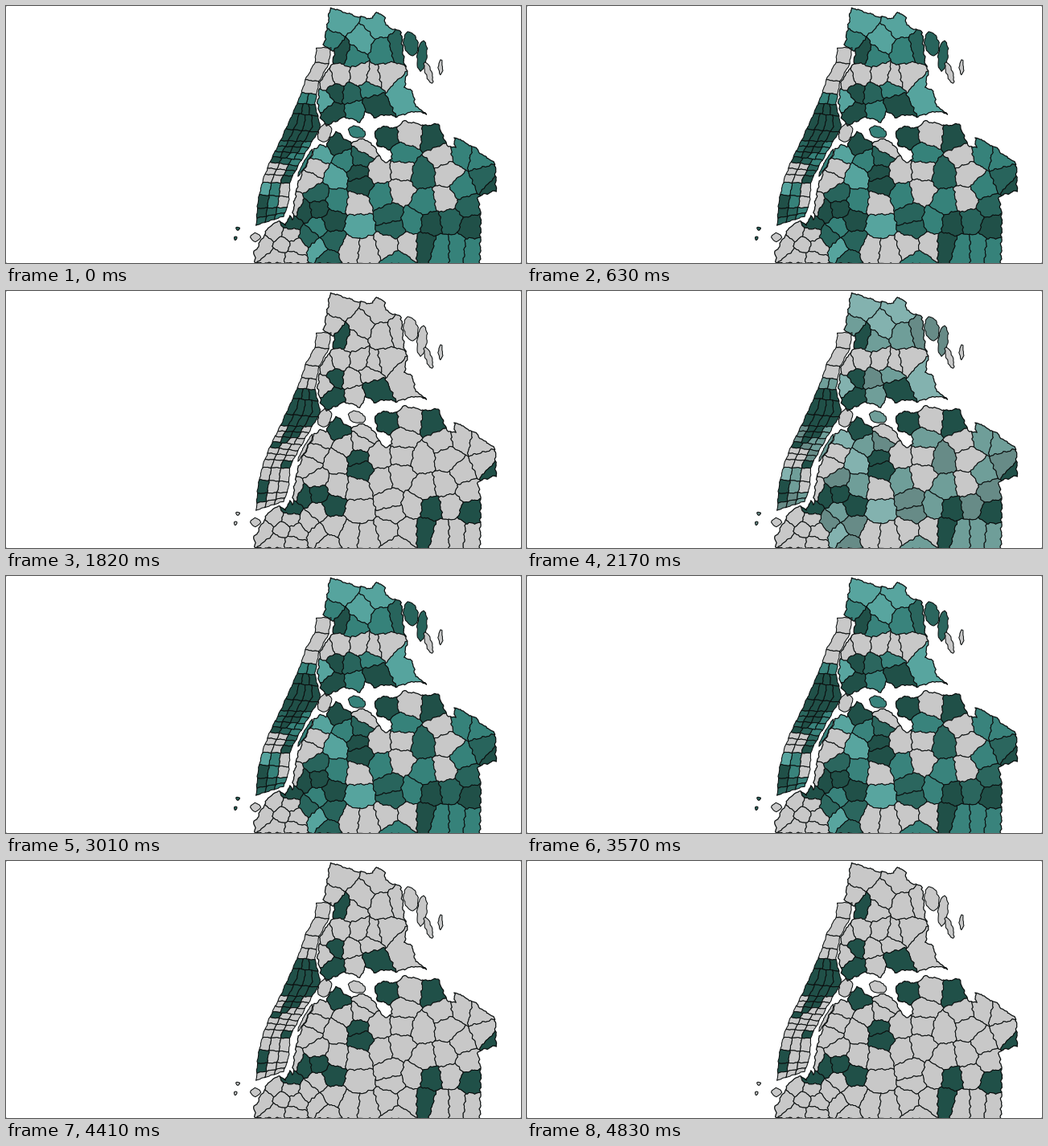
Animation, 640 px wide and 320 px high, one loop 5.53 s. Source, as a matplotlib script:

```python
import numpy as np
import matplotlib.pyplot as plt
from matplotlib.animation import FuncAnimation
from matplotlib.collections import PolyCollection
from matplotlib.patches import Polygon, Rectangle

W, H, DPI = 640, 320, 100
STEP, FRAMES = 70, 79
INK = "#0b0f0f"
# Grey, light, mid, deep and dark classes
COLORS = {
    "G": (200, 200, 200),
    "L": (86, 164, 158),
    "M": (54, 130, 122),
    "D": (40, 100, 92),
    "K": (32, 80, 72),
}
RGB = {kind: np.array(c) / 255 for kind, c in COLORS.items()}

# Coast key points
NORTH = [(403, 2), (436, 13), (456, 16), (459, 7), (470, 13), (472, 24), (491, 33),
         (495, 72), (499, 80), (495, 100), (505, 107), (509, 125), (522, 134), (508, 131),
         (484, 138), (472, 135), (458, 139), (447, 131), (440, 145), (421, 138), (399, 149),
         (392, 142), (387, 122), (391, 92), (406, 72), (408, 57), (395, 49)]
EAST = [(310, 320), (308, 308), (326, 276), (338, 267), (347, 273), (352, 262), (357, 267),
        (357, 252), (362, 224), (367, 210), (383, 179), (391, 173), (398, 175), (402, 165),
        (411, 157), (429, 171), (436, 167), (446, 165), (457, 175), (466, 190), (473, 195),
        (480, 190), (478, 179), (462, 174), (458, 156), (467, 150), (485, 152), (494, 143),
        (521, 149), (537, 147), (548, 173), (558, 177), (557, 163), (580, 175), (608, 197),
        (609, 230), (586, 237), (590, 262), (589, 322)]

# District centres by class
NORTH_SITES = {
    "L": [(415, 20), (441, 45), (464, 24), (491, 106), (396, 117)],
    "M": [(468, 55), (405, 46), (431, 61), (452, 103), (434, 130)],
    "D": [(488, 50), (428, 109)],
    "K": [(418, 57), (410, 108), (408, 133), (457, 122)],
    "G": [(415, 87), (440, 87), (457, 91), (473, 88), (397, 92)],
}
EAST_SITES = {
    "L": [(391, 184), (410, 212), (438, 273), (389, 304)],
    "M": [(422, 193), (494, 185), (466, 235), (567, 183), (588, 187), (520, 246), (567, 227),
          (411, 243), (386, 274), (505, 268), (541, 302), (560, 302), (580, 304), (486, 318)],
    "D": [(517, 208), (440, 190), (595, 215), (552, 266), (574, 249), (478, 262), (481, 276),
          (375, 286), (406, 293), (386, 234), (398, 313)],
    "K": [(412, 171), (438, 207), (442, 222), (472, 162), (531, 163), (606, 225), (528, 270),
          (579, 274), (521, 297), (370, 256), (388, 253), (405, 267), (355, 271)],
    "G": [(385, 200), (377, 218), (448, 175), (463, 206), (502, 160), (541, 187), (549, 208),
          (493, 204), (490, 230), (546, 242), (437, 246), (358, 250), (333, 282), (354, 284),
          (321, 297), (343, 297), (361, 300), (336, 314), (357, 314), (428, 303), (449, 305),
          (474, 298), (500, 297)],
}

# Western island: both shores at equal steps southward
WEST_SHORE = np.array([(386, 52), (384, 70), (372, 92), (367, 108), (362, 121), (351, 146),
                       (340, 170), (329, 192), (319, 217), (313, 243), (311, 273)])
EAST_SHORE = np.array([(404, 52), (401, 72), (389, 94), (386, 110), (384, 123), (391, 151),
                       (379, 171), (364, 197), (353, 218), (351, 246), (345, 262)])
# South end of each row and the classes across it
ROWS = [(1, "G"), (2, "G"), (3, "G"), (4, "MM"), (4.5, "KKK"), (5.3, "KKKK"), (5.9, "KKKK"),
        (6.2, "DKKM"), (6.5, "DKKM"), (6.8, "DKMM"), (7.1, "KDM"), (7.4, "GGD"), (7.7, "GGD"),
        (8.1, "GGK"), (8.7, "LMG"), (9.3, "KMG"), (9.7, "KDM"), (10, "DDM")]

# Islets: centre, radii, tilt, class
ISLETS = [(503, 47, 9, 15, 0.2, "D"), (517, 62, 6, 19, -0.1, "D"), (525, 83, 4, 14, 0.3, "G"),
          (540, 76, 2.5, 9, 0, "G"), (436, 157, 11, 7, -0.3, "M"), (396, 158, 8, 12, -0.4, "G"),
          (372, 195, 2, 19, -0.5, "M"), (310, 288, 6, 5, 0, "G"), (288, 277, 2.5, 2, 0, "D"),
          (285, 289, 2, 2, 0, "D")]


def rough(corners, amp=0.8):
    """Subdivide a closed outline and bend it; shared edges bend alike."""
    a = np.array(corners, float)
    parts = []
    for p, q in zip(a, np.roll(a, -1, axis=0)):
        n = max(int(np.hypot(*(q - p)) / 2), 1)
        parts.append(p + (q - p) * np.arange(n)[:, None] / n)
    x, y = np.concatenate(parts).T
    dx = np.sin(0.55 * y + 0.2 * x) + 0.6 * np.sin(1.1 * y - 0.3 * x)
    dy = np.sin(0.5 * x - 0.2 * y) + 0.6 * np.sin(1.2 * x + 0.3 * y)
    return np.column_stack([x + amp * dx, y + amp * dy])


def cell(site, others):
    """The part of the stage nearer to one site than to the others."""
    shape = [np.array(p, float) for p in [(0, -20), (W, -20), (W, H + 20), (0, H + 20)]]
    for other in others:
        normal = other - site
        if not normal.any():
            continue
        limit = normal @ (site + other) / 2
        kept = []
        for p, q in zip(shape, shape[1:] + shape[:1]):
            a, b = normal @ p - limit, normal @ q - limit
            if a <= 0:
                kept.append(p)
            if a * b < 0:
                kept.append(p + (q - p) * a / (a - b))
        shape = kept
    return shape


def shore_point(s, t):
    i = np.arange(len(WEST_SHORE))
    west, east = (np.array([np.interp(t, i, shore[:, k]) for k in (0, 1)])
                  for shore in (WEST_SHORE, EAST_SHORE))
    return west + (east - west) * s


def grid_cells():
    top = 0
    for bottom, kinds in ROWS:
        n = len(kinds)
        down = np.linspace(top, bottom, 4)
        for k, kind in enumerate(kinds):
            left = [shore_point(k / n, t) for t in down]
            right = [shore_point((k + 1) / n, t) for t in down[::-1]]
            yield rough(left + right, 0.4), kind
        top = bottom


def islet(x, y, rx, ry, tilt):
    a = np.linspace(0, 2 * np.pi, 12, endpoint=False)
    u, v = rx * np.cos(a), ry * np.sin(a)
    c, s = np.cos(tilt), np.sin(tilt)
    return rough(np.column_stack([x + c * u + s * v, y - s * u + c * v]), 0.5)


fig = plt.figure(figsize=(W / DPI, H / DPI), dpi=DPI, facecolor="white")
ax = fig.add_axes([0, 0, 1, 1])
ax.set(xlim=(0, W), ylim=(H, 0))
ax.axis("off")
layers = []


def add_layer(cells, clip=None):
    shapes, kinds = zip(*cells)
    layer = PolyCollection(shapes, edgecolors=INK, linewidths=0.75, joinstyle="round")
    ax.add_collection(layer)
    if clip is not None:
        layer.set_clip_path(clip)
    layers.append((layer, kinds))


def add_land(coast, sites):
    edge = Polygon(rough(coast), fill=False, ec=INK, lw=0.9, joinstyle="round", zorder=3)
    ax.add_patch(edge)
    centres = np.array([p for group in sites.values() for p in group], float)
    kinds = [kind for kind, group in sites.items() for _ in group]
    add_layer([(rough(cell(c, centres)), k) for c, k in zip(centres, kinds)], edge)


add_land(NORTH, NORTH_SITES)
add_land(EAST, EAST_SITES)
add_layer(grid_cells())
add_layer([(islet(*spec), kind) for *spec, kind in ISLETS])
for x in (0, W - 1):
    for y in (0, H - 1):
        ax.add_patch(Rectangle((x, y), 1, 1, color="#b4b8bc", lw=0))


def ease(t, start, end):
    u = min(max((t - start) / (end - start), 0), 1)
    return u * u * (3 - 2 * u)


def draw(i):
    t = i * STEP
    # All but the dark class fade to grey, return, then fade again
    fade = ease(t, 1190, 1750) - ease(t, 1890, 2380) + ease(t, 3500, 4340)
    now = {kind: c + (RGB["G"] - c) * fade for kind, c in RGB.items()}
    now["K"] = RGB["K"]
    for layer, kinds in layers:
        layer.set_facecolor([now[kind] for kind in kinds])
    return [layer for layer, _ in layers]


anim = FuncAnimation(fig, draw, frames=FRAMES, interval=STEP, repeat=True, repeat_delay=0)
plt.show()
```
